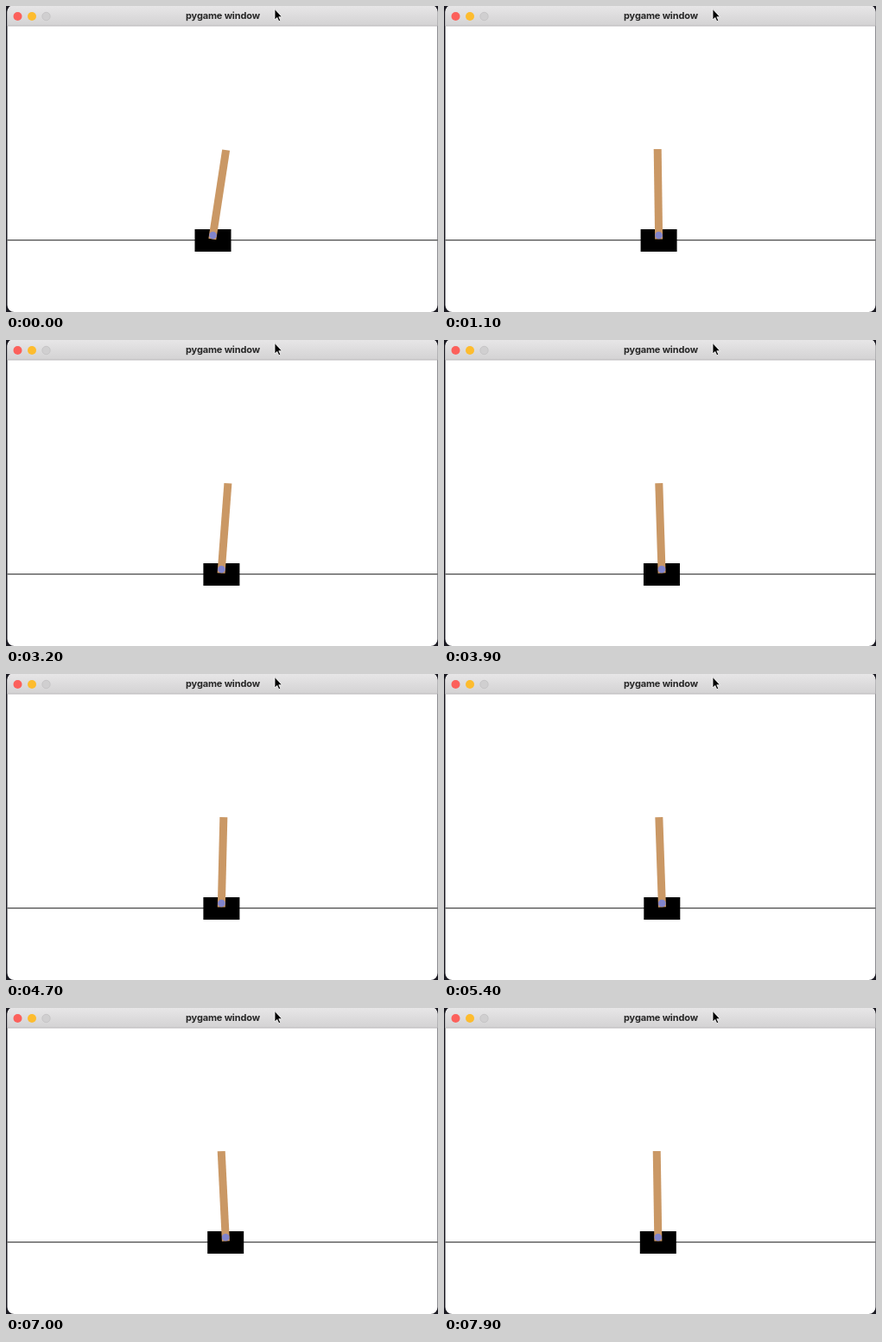
Write an HTML page that moves like this. It is 500 px wide and 355 px high and loops after 8000 ms.

```html
<!DOCTYPE html>
<html lang="en">
<head>
<meta charset="utf-8">
<title>Cart and pole</title>
<style>
  html, body { margin: 0; width: 100%; height: 100%; overflow: hidden; background: #1b1a22; }
  svg { display: block; width: 500px; height: 355px; }
  text { font: 700 11px Inter, "Liberation Sans", sans-serif; fill: #262626; text-anchor: middle; }
</style>
</head>
<body>
<svg viewBox="0 0 500 355">
  <defs>
    <linearGradient id="bar" x2="0" y2="1">
      <stop stop-color="#e7e6e7"/>
      <stop offset="1" stop-color="#d3d2d3"/>
    </linearGradient>
    <clipPath id="frame"><rect x="1.5" y="-1" width="498" height="356" rx="8"/></clipPath>
  </defs>
  <g clip-path="url(#frame)">
    <rect width="500" height="355" fill="#fff"/>
    <rect width="500" height="23" fill="url(#bar)"/>
    <rect y="22.5" width="500" height="1" fill="#b9b8b9"/>
    <circle cx="13.5" cy="12" r="5" fill="#fc605b"/>
    <circle cx="30" cy="12" r="5" fill="#fdbc2e"/>
    <circle cx="46.5" cy="12" r="4.7" fill="#d0cfd0" stroke="#bfbebf" stroke-width=".7"/>
    <text x="251" y="15.3" textLength="86">pygame window</text>
    <rect y="271" width="500" height="1.2" fill="#444"/>
    <g id="cart">
      <rect x="-21" y="259" width="42" height="26" fill="#000"/>
      <g id="pole">
        <rect x="-4.5" y="166" width="9" height="104.5" fill="#ca9865"/>
        <circle cy="266" r="4.3" fill="#8184cb"/>
      </g>
    </g>
  </g>
  <path d="M311 3.5V16l2.8-2.6 2 4.4 2-.9-2-4.2h3.7z" fill="#000" stroke="#fff" stroke-width=".8"/>
</svg>
<script>
  // time in ms, cart centre in px, pole tilt in degrees
  const poses = [
    [0, 239.5, 8.7], [1100, 248.6, -0.8], [2000, 254.6, -10], [3200, 249.4, 4.3],
    [3950, 252, -2], [4700, 249.4, 1.4], [5450, 252.5, -2], [6200, 254.5, 2.6],
    [7050, 254, -3], [7900, 247.8, -0.9]
  ];
  const cart = document.getElementById("cart");
  const pole = document.getElementById("pole");
  const last = poses.length - 1;

  function slope(i, k) {
    const a = poses[Math.max(i - 1, 0)], b = poses[Math.min(i + 1, last)];
    return (b[k] - a[k]) / (b[0] - a[0]);
  }

  // Cubic Hermite curve through the poses
  function valueAt(t, k) {
    let i = 0;
    while (i < last - 1 && t >= poses[i + 1][0]) i++;
    const a = poses[i], b = poses[i + 1], span = b[0] - a[0];
    const u = (t - a[0]) / span, v = 1 - u;
    return v * v * (1 + 2 * u) * a[k] + u * u * (3 - 2 * u) * b[k]
      + u * v * span * (v * slope(i, k) - u * slope(i + 1, k));
  }

  function draw() {
    const t = Math.floor(performance.now() % 8000 / 100) * 100;
    cart.setAttribute("transform", `translate(${valueAt(t, 1).toFixed(2)} 0)`);
    pole.setAttribute("transform", `rotate(${valueAt(t, 2).toFixed(2)} 0 266)`);
    requestAnimationFrame(draw);
  }
  draw();
</script>
</body>
</html>
```
